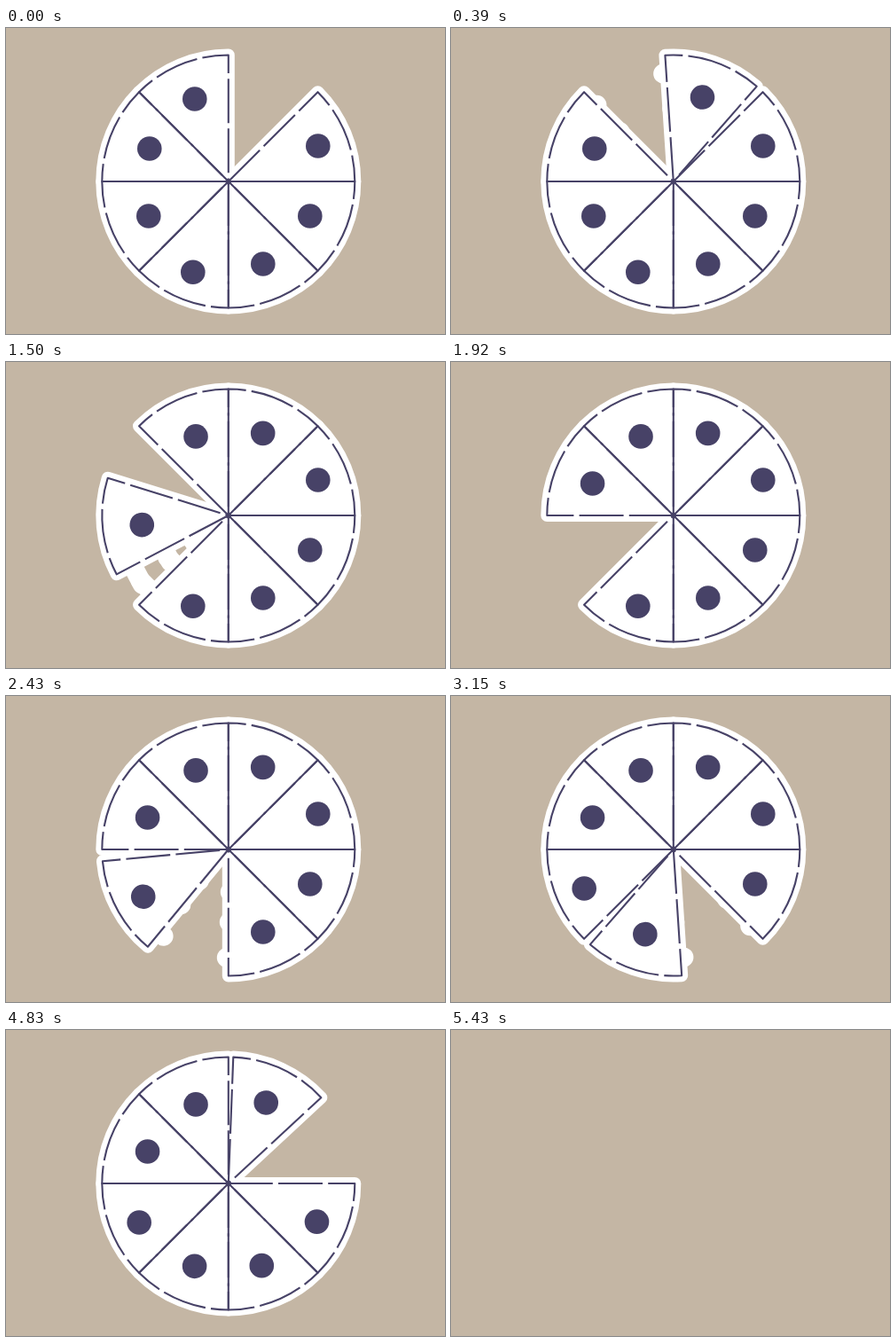
Recreate the animation shown at these times as an HTML page with a canvas. Size 495 by 345 pixels, loop 5490 ms.

```html
<!DOCTYPE html>
<html lang="en">
<head>
<meta charset="utf-8">
<title>Pizza slices</title>
<style>
  html, body { margin: 0; width: 100%; height: 100%; overflow: hidden; background: #c4b6a4; }
  canvas { display: block; }
</style>
</head>
<body>
<canvas id="stage" width="495" height="345"></canvas>
<script>
const ctx = document.getElementById('stage').getContext('2d');
const LOOP = 5490, STEP = 30, BLANK_AT = 181;
const RADIUS = 142.5, RIM = 14, WEDGE = Math.PI / 4;
const BACK = '#c4b6a4', INK = '#474267';
const CENTER = [250.8, 173];

// Moves are timed in steps of 30 ms.
const STARTS = [0, 22, 45.3, 69, 92, 115, 138, 160];
const MOVE_STEPS = 18.7;

// Topping positions relative to the center, going counterclockwise from the top.
const DOTS = [[-38, -93], [-89, -37], [-90, 39], [-40, 102.3], [39, 93], [92, 39], [101, -40]];

// Cheese strands: distance from the center, reach from the resting and the moving edge.
const STRANDS = [
  { at: 122, rest: 24, pull: 29 },
  { at: 82, rest: 21, pull: 21.5 },
  { at: 48, rest: 20, pull: 20 }
];
const STRAND_R = 11;

const bezier = (s, a, b) => 3 * (1 - s) * (1 - s) * s * a + 3 * (1 - s) * s * s * b + s * s * s;

function ease(x) {
  if (x <= 0) return 0;
  if (x >= 1) return 1;
  let lo = 0, hi = 1;
  for (let i = 0; i < 24; i++) {
    const mid = (lo + hi) / 2;
    if (bezier(mid, 0.2, 0.39) < x) lo = mid; else hi = mid;
  }
  return bezier(lo, 0.12, 1);
}

const turn = (move, step) => WEDGE * ease((step - STARTS[move]) / MOVE_STEPS);

// Angle of a slice's counterclockwise edge before any move; canvas angles, 0 points right.
const homeAngle = i => -Math.PI / 2 - WEDGE * (i + 1);

function slicePath(angle) {
  ctx.beginPath();
  ctx.moveTo(0, 0);
  ctx.arc(0, 0, RADIUS, angle, angle + WEDGE);
  ctx.closePath();
}

// A round-ended blob growing sideways out of an edge.
function blob(angle, at, reach, side) {
  if (reach <= RIM / 2) return;
  const tip = reach - STRAND_R;
  ctx.save();
  ctx.rotate(angle);
  ctx.lineWidth = STRAND_R * 2;
  ctx.lineCap = 'round';
  ctx.beginPath();
  ctx.moveTo(at, side * Math.min(tip, 0));
  ctx.lineTo(at, side * (tip + 0.01));
  ctx.stroke();
  ctx.restore();
}

function drawStrands(step) {
  STARTS.forEach((start, move) => {
    const age = step - start;
    const swing = turn(move, step);
    if (age <= 0 || age > 17) return;
    const edge = homeAngle(move % 7) + (move === 7 ? WEDGE : 0);
    for (const { at, rest, pull } of STRANDS) {
      const gap = at * swing + STRAND_R;
      blob(edge, at, Math.min(rest - 2.2 * (age - 7), gap), 1);
      blob(edge + swing, at, Math.min(pull - 2.4 * (age - 7), gap), -1);
    }
  });
}

function draw(step) {
  ctx.setTransform(1, 0, 0, 1, 0, 0);
  ctx.fillStyle = BACK;
  ctx.fillRect(0, 0, 495, 345);
  if (step >= BLANK_AT) return;

  ctx.translate(...CENTER);
  const turns = DOTS.map((_, i) => turn(i, step) + (i === 0 ? turn(7, step) : 0));

  ctx.fillStyle = ctx.strokeStyle = '#fff';
  ctx.lineJoin = 'round';
  drawStrands(step);
  ctx.lineWidth = RIM;
  turns.forEach((a, i) => {
    slicePath(homeAngle(i) + a);
    ctx.fill();
    ctx.stroke();
  });

  ctx.fillStyle = ctx.strokeStyle = INK;
  ctx.lineWidth = 2.1;
  ctx.lineCap = 'butt';
  turns.forEach((a, i) => {
    ctx.save();
    ctx.rotate(a);
    ctx.setLineDash([50, 6.2]);
    slicePath(homeAngle(i));
    ctx.stroke();
    ctx.beginPath();
    ctx.arc(...DOTS[i], 13.8, 0, Math.PI * 2);
    ctx.fill();
    ctx.restore();
  });
}

const origin = performance.now();
function tick() {
  const time = (performance.now() - origin) % LOOP;
  draw(Math.floor(time / STEP));
  requestAnimationFrame(tick);
}
tick();
</script>
</body>
</html>
```
